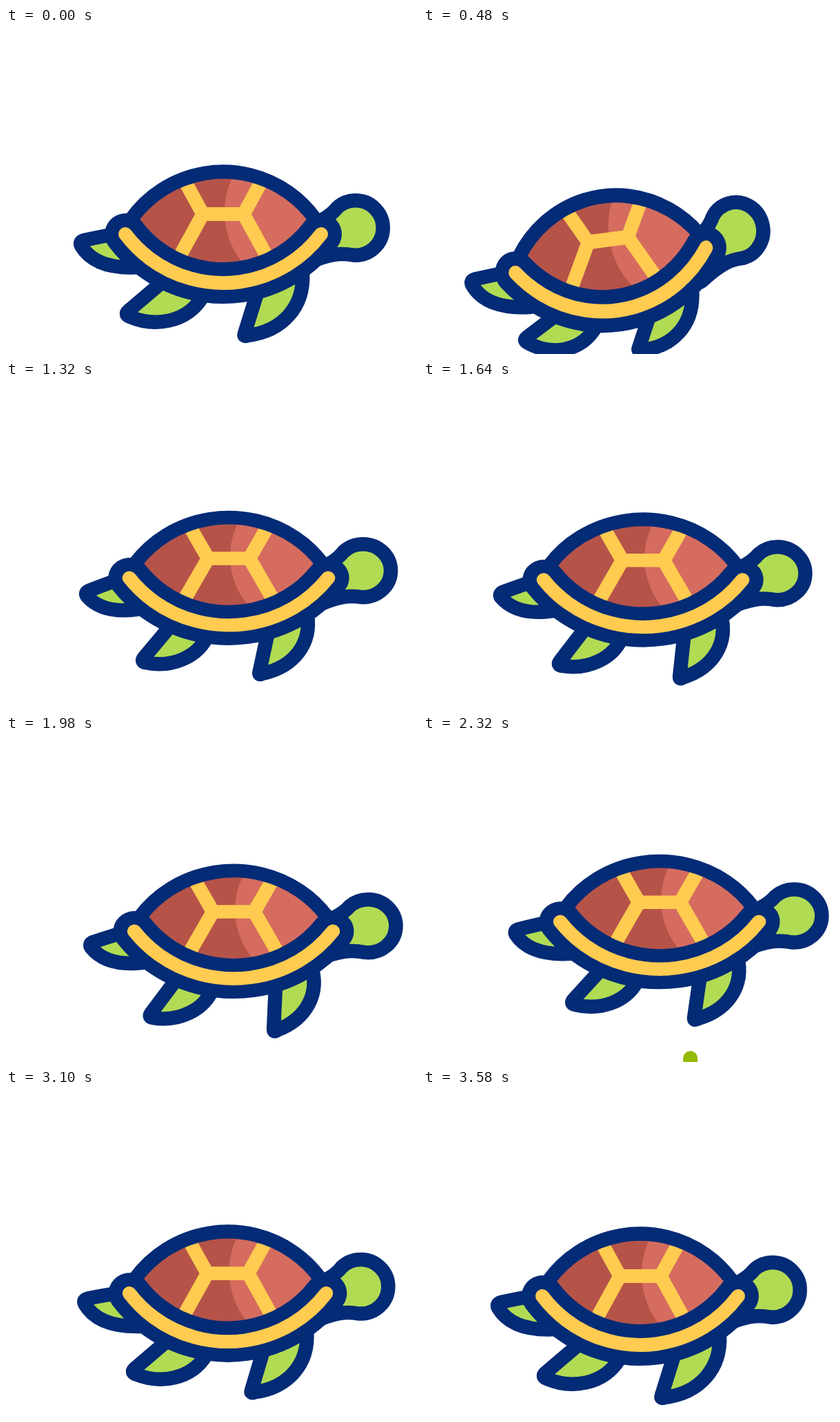
Write an HTML page with a canvas that moves like this. It is 596 px wide and 473 px high and loops after 3600 ms.

```html
<!DOCTYPE html>
<html lang="en">
<head>
<meta charset="utf-8">
<title>Swimming turtle</title>
<style>
  html, body { margin: 0; width: 100%; height: 100%; overflow: hidden; background: #fff; }
  canvas { display: block; }
</style>
</head>
<body>
<canvas id="stage" width="596" height="473"></canvas>
<script>
const ctx = document.getElementById('stage').getContext('2d');
const LOOP = 3600;
const NAVY = '#032b76', GREEN = '#b1db53', YELLOW = '#ffcb50';
const DARK = '#b55349', LIGHT = '#d56c5f', WEED = '#94ba06';
const CENTER = [315, 270];
const OUTLINE = 20.5;

// time, x, y, tilt, squash, head, tail, back leg, front leg (degrees), leg length
const KEYS = [
  [120, 0, 0, 0, 0, 0, 0, 0, 0, 1],
  [480, -46.5, 37, -7.5, -.035, -10.7, 7, 12, 9.6, .91],
  [560, -66, 43, -8.5, -.035, -11, 7, 12, 10, .91],
  [850, 33, -47, 0, .028, 1, -2, -2, -3, .965],
  [920, 25, -35.5, 0, .032, 0, -3, -4, -4.4, .965],
  [1320, 8, -14, 0, .032, -2, -10, -11, -5.7, .91],
  [1540, 3, -11, 0, .032, -1, -9.5, -13, -10, .905],
  [1980, 15, -15, 0, .03, 1.5, -7, -14, -14.8, .905],
  [2400, 29, -30, 0, .03, 0, -1, -7, -8, .905],
  [2660, 22, -15.5, 0, .028, -2, 3, -2.6, -4, .91],
  [3440, 0, 0, 0, 0, 0, 0, 0, 0, 1]
];

const rate = (i, c) => (KEYS[i + 1][c] - KEYS[i][c]) / (KEYS[i + 1][0] - KEYS[i][0]);

// Slope that never overshoots a key
function slope(i, c) {
  if (i === 0 || i === KEYS.length - 1) return 0;
  const a = rate(i - 1, c), b = rate(i, c);
  return a * b <= 0 ? 0 : 2 * a * b / (a + b);
}

function poseAt(time) {
  const last = KEYS.length - 1;
  const t = Math.min(Math.max(time, KEYS[0][0]), KEYS[last][0]);
  let i = 0;
  while (i < last - 1 && t > KEYS[i + 1][0]) i++;
  const span = KEYS[i + 1][0] - KEYS[i][0];
  const u = (t - KEYS[i][0]) / span;
  const v = 1 - u;
  return KEYS[i].slice(1).map((from, n) => {
    const c = n + 1;
    return from * v * v * (1 + 2 * u) + KEYS[i + 1][c] * u * u * (3 - 2 * u)
      + span * (slope(i, c) * u * v * v - slope(i + 1, c) * u * u * v);
  });
}

const radians = deg => deg * Math.PI / 180;

function placeBody([x, y, tilt, squash]) {
  ctx.translate(CENTER[0] + x, CENTER[1] + y);
  ctx.rotate(radians(tilt));
  ctx.scale(1 + squash * .5, 1 - squash);
  ctx.translate(-CENTER[0], -CENTER[1]);
}

function drawLimb(pose, [px, py], angle, size, trace) {
  ctx.save();
  placeBody(pose);
  ctx.translate(px, py);
  ctx.rotate(radians(angle));
  ctx.scale(size, size);
  ctx.translate(-px, -py);
  ctx.beginPath();
  trace();
  ctx.restore();
  ctx.fillStyle = GREEN;
  ctx.fill();
  ctx.strokeStyle = NAVY;
  ctx.lineWidth = OUTLINE;
  ctx.stroke();
}

function traceHead() {
  ctx.moveTo(430, 290);
  ctx.bezierCurveTo(452, 282, 468, 276, 480, 261);
  ctx.arc(507, 290, 39.7, radians(-133), radians(95));
  ctx.bezierCurveTo(485, 326, 470, 327, 435, 342);
}

function traceTail() {
  ctx.moveTo(175, 296);
  ctx.quadraticCurveTo(140, 302, 113, 308);
  ctx.quadraticCurveTo(106, 310, 109, 316);
  ctx.bezierCurveTo(122, 338, 150, 350, 195, 347);
}

function traceBackLeg() {
  ctx.moveTo(245, 353);
  ctx.lineTo(178, 410);
  ctx.quadraticCurveTo(171, 416, 180, 419);
  ctx.bezierCurveTo(215, 434, 262, 428, 285, 390);
  ctx.lineTo(290, 370);
}

function traceFrontLeg() {
  ctx.moveTo(375, 350);
  ctx.lineTo(346, 443);
  ctx.quadraticCurveTo(344, 449, 351, 446);
  ctx.bezierCurveTo(400, 440, 433, 405, 430, 355);
}

const traceDome = () => ctx.arc(315, 372.6, 164, Math.PI + .62, -.62);
const traceBand = (a, b, back) => ctx.arc(315, 192.5, 177.5, radians(a), radians(b), back);

function strokeArc(trace, color, width) {
  ctx.beginPath();
  trace();
  ctx.strokeStyle = color;
  ctx.lineWidth = width;
  ctx.stroke();
}

function drawShell(pose) {
  ctx.save();
  placeBody(pose);

  ctx.save();
  ctx.beginPath();
  traceDome();
  traceBand(36.9, 143.1, false);
  ctx.clip();
  ctx.fillStyle = DARK;
  ctx.fillRect(130, 180, 370, 240);
  ctx.beginPath();
  ctx.arc(435, 267, 118, 0, 2 * Math.PI);
  ctx.fillStyle = LIGHT;
  ctx.fill();

  strokeArc(() => {
    ctx.moveTo(285.5, 270);
    ctx.lineTo(344.5, 270);
    for (const side of [-1, 1]) {
      ctx.moveTo(315 + side * 58, 218);
      ctx.lineTo(315 + side * 29.5, 270);
      ctx.lineTo(315 + side * 68, 340);
    }
  }, YELLOW, 20);
  ctx.restore();

  strokeArc(traceDome, NAVY, OUTLINE);
  const band = () => traceBand(36.9, 143.1, false);
  strokeArc(band, NAVY, 60);
  strokeArc(band, YELLOW, 20);
  ctx.restore();
}

function drawWeed(time) {
  const x = 116.5 - (time - 2660) * .8;
  if (x < -12 || x > 608) return;
  strokeArc(() => {
    ctx.moveTo(x, 467.5);
    ctx.lineTo(x, 500);
  }, WEED, 21);
}

function draw(time) {
  ctx.fillStyle = '#fff';
  ctx.fillRect(0, 0, 596, 473);
  ctx.lineCap = ctx.lineJoin = 'round';
  const pose = poseAt(time);
  const [, , , , head, tail, back, front, length] = pose;
  drawWeed(time);
  drawLimb(pose, [173, 299], tail, 1, traceTail);
  drawLimb(pose, [255, 365], back, length, traceBackLeg);
  drawLimb(pose, [402, 360], front, length, traceFrontLeg);
  drawLimb(pose, [457, 299], head, 1, traceHead);
  drawShell(pose);
}

const start = performance.now();
function tick() {
  draw((performance.now() - start) % LOOP);
  requestAnimationFrame(tick);
}
tick();
</script>
</body>
</html>
```
